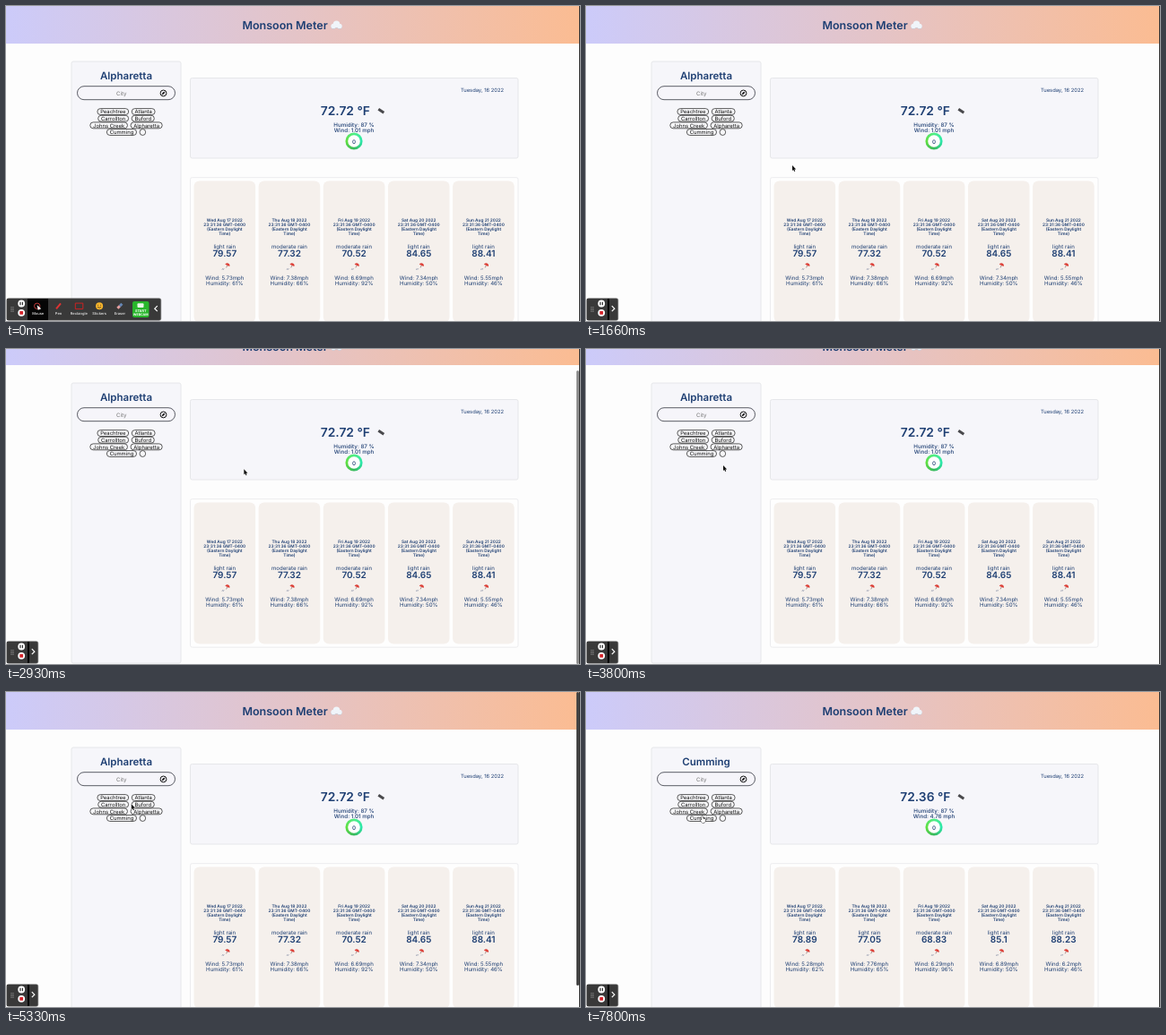
An HTML page with a canvas that plays this animation: 640 px wide and 352 px high, repeating every 8 s.

```html
<!DOCTYPE html>
<html lang="en">
<head>
<meta charset="utf-8">
<title>Monsoon Meter</title>
<style>
html, body { margin: 0; width: 100%; height: 100%; overflow: hidden; background: #fdfdfd; }
canvas { display: block; }
</style>
</head>
<body>
<canvas id="stage" width="640" height="352"></canvas>
<script>
const c = document.getElementById('stage').getContext('2d');
const LOOP = 8000, NAVY = '#1e3f73', PANEL = '#f6f6fa', EDGE = '#e6e7ea';

// Each day: sky, temperature, wind, humidity
const alpharetta = {
  name: 'Alpharetta', temp: '72.72', wind: '1.01',
  days: ['light rain,79.57,5.73,61', 'moderate rain,77.32,7.38,66', 'moderate rain,70.52,6.69,92',
    'light rain,84.65,7.34,50', 'light rain,88.41,5.55,46']
};
const cumming = {
  name: 'Cumming', temp: '72.36', wind: '4.76',
  days: ['light rain,78.89,5.28,62', 'light rain,77.05,7.76,65', 'moderate rain,68.83,6.29,96',
    'light rain,85.1,6.89,50', 'light rain,88.23,6.2,46']
};
const history = [['Peachtree', 'Atlanta'], ['Carrollton', 'Buford'], ['Johns Creek', 'Alpharetta'], ['Cumming', '']];

// Pointer stops: start, end, x, y
const stops = [[0, 600, 167, 338], [1500, 2000, 230, 178], [2330, 2660, 284, 135],
  [3800, 3800, 153, 130], [4800, 4800, 143, 121], [6500, LOOP, 129, 139]];

function ease(t, from, to) {
  const p = Math.min(1, Math.max(0, (t - from) / (to - from)));
  return p * p * (3 - 2 * p);
}

function pointerAt(t) {
  let [, , x, y] = stops[0];
  for (let i = 1; i < stops.length; i++) {
    const [start, , nx, ny] = stops[i], p = ease(t, stops[i - 1][1], start);
    x += (nx - x) * p;
    y += (ny - y) * p;
  }
  return [x, y];
}

// y is the middle of the capitals
function text(s, x, y, size, weight = 500, color = NAVY, align = 'center') {
  c.font = `${weight} ${size}px Inter, sans-serif`;
  c.textAlign = align;
  c.fillStyle = color;
  c.fillText(s, x, y + size * .36 + .3);
}

function paint(fill, stroke, line) {
  if (fill) { c.fillStyle = fill; c.fill(); }
  if (stroke) { c.strokeStyle = stroke; c.lineWidth = line; c.stroke(); }
}

function box(x, y, w, h, r, fill, stroke, line = 1) {
  c.beginPath();
  c.roundRect(x, y, w, h, r);
  paint(fill, stroke, line);
}

function dot(x, y, r, fill, stroke, line = 1) {
  c.beginPath();
  c.arc(x, y, r, 0, 7);
  paint(fill, stroke, line);
}

function path(d, x, y, fill, stroke, line = 1) {
  c.save();
  c.translate(x, y);
  const p = new Path2D(d);
  if (stroke) { c.strokeStyle = stroke; c.lineWidth = line; c.stroke(p); }
  if (fill) { c.fillStyle = fill; c.fill(p); }
  c.restore();
}

function cloud(x, y, fill) {
  for (let i = -1; i <= 1; i++) dot(x + i * 3.4, y + Math.abs(i) * 2.2, 3.7 - Math.abs(i), fill);
}

function header() {
  const g = c.createLinearGradient(0, 0, 640, 0);
  ['#cccbfa', '#e4c4c8', '#fbbc92'].forEach((color, i) => g.addColorStop(i / 2, color));
  c.fillStyle = g;
  c.fillRect(0, 0, 640, 42);
  text('Monsoon Meter', 311, 21.1, 12.5, 600);
  cloud(368.5, 20.9, '#c3d0df');
  cloud(368.5, 20.2, '#f0f5fa');
}

function sidebar(town) {
  box(73, 62, 122, 313, 2, PANEL, EDGE);
  text(town.name, 134, 77.3, 11.5, 600);
  box(79.5, 89.7, 109, 15, 7.5, '#f6f5fa', '#4a4c55', .9);
  text('City', 128.7, 97.1, 6.1, 400, '#777');
  dot(175.5, 97.4, 3.4, null, '#111');
  path('M2-2L.7.8L-2 2L-.7-.8Z', 175.5, 97.4, '#111');
  history.forEach((row, i) => {
    c.font = '400 5.9px Inter, sans-serif';
    const widths = row.map(s => c.measureText(s).width + 6.5);
    const y = 118 + i * 7.65;
    let x = 134 - (widths[0] + widths[1] + 3.6) / 2;
    row.forEach((s, j) => {
      box(x, y - 3.4, widths[j], 6.9, 3.4, '#f7f7f9', '#333', .8);
      text(s, x + widths[j] / 2, y, 5.9, 400, '#111');
      x += widths[j] + 3.6;
    });
  });
}

function today(town) {
  box(205.5, 80.5, 365.5, 89.5, 2, PANEL, EDGE);
  text('Tuesday, 16 2022', 555, 93.8, 5.8, 400, NAVY, 'right');
  text(town.temp + ' °F', 378.3, 116.6, 13.8, 600);
  path('M-3-2L3 2', 418.3, 117.2, null, '#4a4a4d', 3);
  text('Humidity: 87 %', 388, 132.5, 6.2);
  text(`Wind: ${town.wind} mph`, 388, 138.6, 6.2);
  const g = c.createConicGradient(-Math.PI / 2, 388, 151);
  ['#4fee86', '#2de8ad', '#37b85c', '#62df42', '#4fee86'].forEach((color, i) => g.addColorStop(i / 4, color));
  dot(388, 151, 8.2, '#fff', g, 2.8);
  text('0', 388, 151, 6.2);
}

function umbrella(x, y) {
  path('M-2.5-1A2.6 2.6 0 0 1 2.3 1.2Z', x + 3, y - 1.2, '#dc4038');
  path('M0 0L-1.2 2.4', x + 3, y - 1, null, '#764c4c', .6);
  path('M-2 2L-3 4M-.6 2L-1.6 4', x, y, null, '#9aa0b2', .7);
}

function forecast(town) {
  box(205.5, 191.7, 365.5, 165.5, 2, '#fefefe', '#ececee');
  town.days.forEach((day, i) => {
    const [sky, temp, wind, humidity] = day.split(',');
    const x = 243.8 + i * 72.15;
    box(x - 34.3, 195.6, 68.6, 158, 6, '#f5f0ec');
    const date = `${['Wed', 'Thu', 'Fri', 'Sat', 'Sun'][i]} Aug ${17 + i} 2022`;
    [date, '23:31:36 GMT-0400', '(Eastern Daylight', 'Time)'].forEach((s, j) =>
      text(s, x, 239.4 + j * 4.8, 4.75, 600));
    text(sky, x, 268.5, 6.1, 400);
    text(temp, x, 276.5, 10, 600);
    umbrella(x, 291);
    text(`Wind: ${wind}mph`, x, 303.3, 6.1, 400);
    text(`Humidity: ${humidity}%`, x, 309.5, 6.1, 400);
  });
}

function tools() {
  const x = i => 35.7 + i * 22.8, y = 335.3;
  box(24, 327, 23, 24, 0, '#050505');
  ['Mouse', 'Pen', 'Rectangle', 'Stickers', 'Eraser'].forEach((s, i) =>
    text(s, x(i), 343.7, 4, 500, '#eee'));
  dot(x(0) - 1, y, 3.2, null, '#e44', .8);
  path('M0 0L4.5 4L1 5.5Z', x(0) - 1, y - 1, '#fff');
  path('M2.5-3L-2.5 3', x(1), y, null, '#d33', 2);
  box(x(2) - 4, y - 3.2, 8.5, 6.5, 0, null, '#c22');
  dot(x(3), y, 4, '#f7b52c');
  path('M-2 1Q0 3 2 1M-2-1h1M1-1h1', x(3), y, null, '#432', .8);
  path('M-2.5 2.5L0 0', x(4), y, null, '#e8a0a0', 3);
  path('M0 0L2.5-2.5', x(4), y, null, '#6687b5', 3);
  box(141, 330, 18.5, 18, 2, '#29b62c');
  box(146.5, 332.3, 7, 4.6, 1, '#e9f7e9');
  text('START', 150.2, 340.2, 3.8, 700, '#fff');
  text('WEBCAM', 150.2, 344.4, 3.6, 700, '#fff');
}

function tray(width) {
  box(.8, 326.7, width - 1, 24.6, 2, '#393939', '#777', .6);
  c.save();
  c.beginPath();
  c.rect(1, 327, width - 11, 24);
  c.clip();
  tools();
  box(1, 327, 23, 24, 0, '#393939');
  for (let i = 0; i < 6; i++) dot(6 + i % 2 * 2, 336.7 + (i >> 1) * 2.2, .55, '#bbb');
  dot(17.2, 332.5, 3.9, '#fff');
  path('M-1.2-1.8v3.6M1.2-1.8v3.6', 17.2, 332.5, null, '#222', 1.1);
  dot(17.2, 342.8, 3.9, '#fff');
  box(15.3, 340.9, 3.8, 3.8, .5, '#d5252c');
  c.restore();
  path(width > 100 ? 'M1.5-3L-1.5 0L1.5 3' : 'M-1.5-3L1.5 0L-1.5 3', width - 5.7, 338.2, null, '#fff', 1.2);
}

function pointer(x, y, hand) {
  if (hand) path('M0 0h1.2l.2 2.4l2.8.6v2.5l-1 1.5h-2.8l-1.9-2.8l.6-.6l.9.7Z', x, y, '#fff', '#111', .9);
  else path('M0 0v6l1.3-1.1l.9 2.1l1-.4l-.8-2.1l1.8-.1Z', x, y, '#111', '#fff', .9);
}

function draw(now) {
  const t = now % LOOP;
  const scroll = 24 * (ease(t, 2200, 2330) - ease(t, 4400, 4860));
  const bar = ease(t, 2180, 2200) - ease(t, 2800, 3100) + ease(t, 4380, 4400) - ease(t, 5800, 6060);
  const town = t < 7260 ? alpharetta : cumming;
  c.textRendering = 'geometricPrecision';
  box(0, 0, 640, 352, 0, '#fdfdfd');
  c.save();
  c.translate(0, -scroll);
  header();
  sidebar(town);
  today(town);
  forecast(town);
  c.restore();
  c.globalAlpha = bar;
  box(636, scroll, 3, 328, 1.5, '#444');
  c.globalAlpha = 1;
  box(639, 0, 1, 352, 0, '#333');
  tray(173 - 137 * ease(t, 450, 600));
  if (t >= 200) pointer(...pointerAt(t), t >= 6400);
  requestAnimationFrame(draw);
}
requestAnimationFrame(draw);
</script>
</body>
</html>
```
